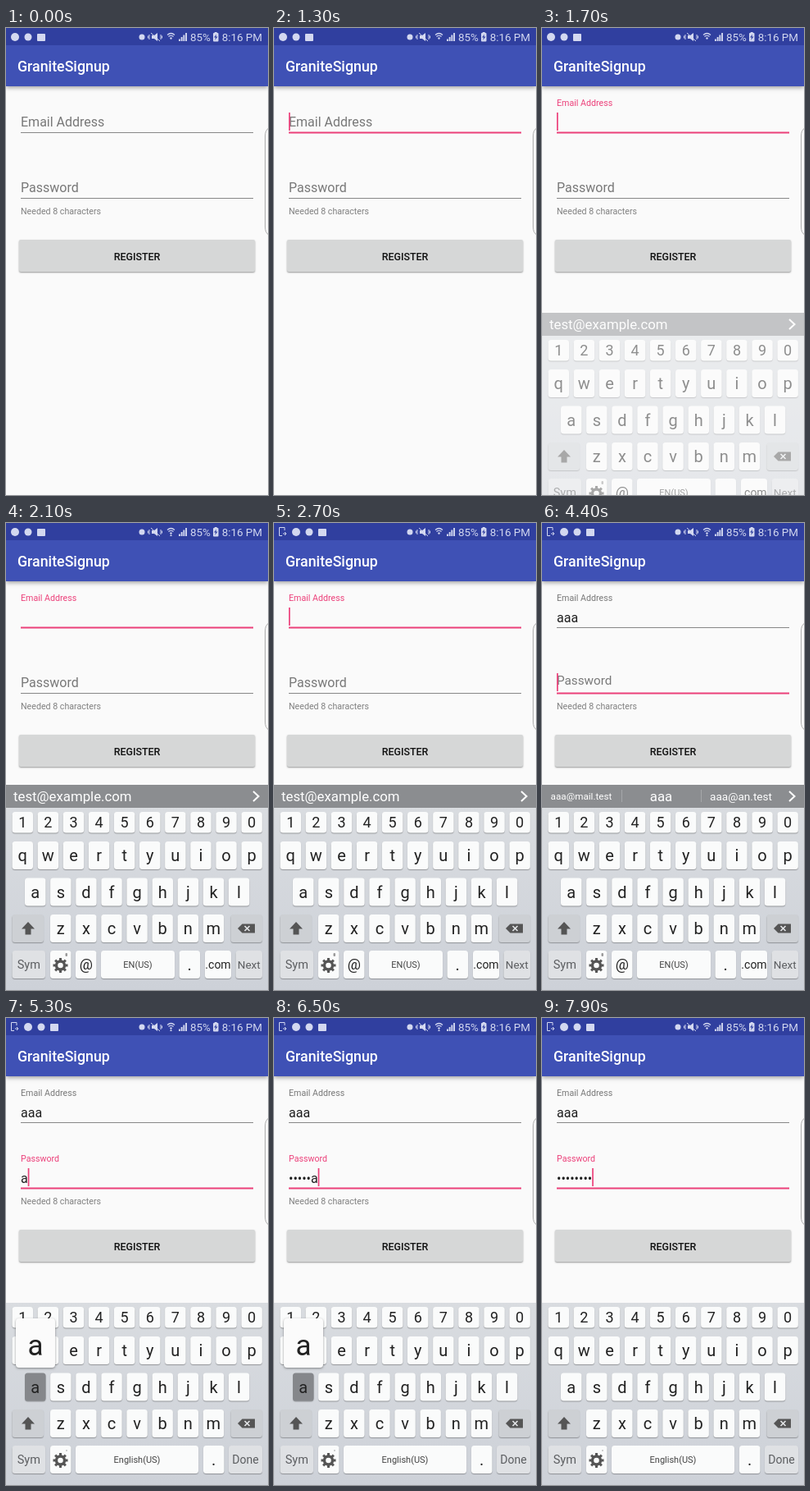
An HTML page with a canvas for the animation above (8 s loop, 320x569 px).

```html
<!DOCTYPE html>
<html lang="en">
<head>
<meta charset="utf-8">
<title>Sign-up form</title>
<style>
  html, body { margin: 0; width: 100%; height: 100%; overflow: hidden; background: #fafafa; }
  canvas { display: block; width: 320px; height: 569px; }
</style>
</head>
<body>
<canvas id="stage"></canvas>
<script>
const canvas = document.getElementById('stage');
const ctx = canvas.getContext('2d');
const ratio = window.devicePixelRatio || 1;
canvas.width = 320 * ratio;
canvas.height = 569 * ratio;

const LOOP = 8000;
const PAPER = '#fafafa', PINK = '#ec407a', GREY = '#787878', ICON = '#d3d8f0';

// Timeline in milliseconds
const FOCUS_EMAIL = 1300, FOCUS_PASSWORD = 4355;
const KEYBOARD_IN = 1500, KEYBOARD_READY = 2000, KEYBOARD_SWAP = 4550;
const NOTICE = 2150, SUGGESTIONS = 3690, MASK_LAST = 7850;
const emailPresses = [2850, 3130, 3400];
const passwordPresses = Array.from({ length: 8 }, (_, i) => 5180 + 262 * i);
const presses = [...emailPresses, ...passwordPresses];
const blinkResets = [FOCUS_EMAIL, FOCUS_PASSWORD, ...presses, 7190, MASK_LAST];
const HOLD = 130, LINGER = 50;

const clamp = v => Math.max(0, Math.min(1, v));
const ease = v => { const p = clamp(v); return p * p * (3 - 2 * p); };
const mix = (a, b, p) => a + (b - a) * p;
const countBefore = (times, t) => times.filter(time => time <= t).length;

function text(str, x, y, size, color, align = 'left', weight = 400) {
  ctx.font = `${weight} ${size}px Roboto, sans-serif`;
  ctx.textAlign = align;
  ctx.fillStyle = color;
  ctx.fillText(str, x, y);
  return ctx.measureText(str).width;
}

function rect(x, y, w, h, color) {
  ctx.fillStyle = color;
  ctx.fillRect(x, y, w, h);
}

function box(x, y, w, h, r, color) {
  ctx.beginPath();
  ctx.roundRect(x, y, w, h, r);
  ctx.fillStyle = color;
  ctx.fill();
}

function disc(x, y, r, color) {
  ctx.beginPath();
  ctx.arc(x, y, r, 0, 7);
  ctx.fillStyle = color;
  ctx.fill();
}

function stroke(path, color, width = 1) {
  ctx.strokeStyle = color;
  ctx.lineWidth = width;
  ctx.stroke(new Path2D(path));
}

function fill(path, color) {
  ctx.fillStyle = color;
  ctx.fill(new Path2D(path));
}

function shadowed(blur, dy, alpha, draw) {
  ctx.save();
  ctx.shadowColor = `rgba(0,0,0,${alpha})`;
  ctx.shadowBlur = blur * ratio;
  ctx.shadowOffsetY = dy * ratio;
  draw();
  ctx.restore();
}

function statusBar(t) {
  rect(0, 0, 320, 21, '#303f9f');
  let x = 11;
  if (t >= NOTICE) {
    stroke('M13 9V5.5H6.5V15.5H10M11 13H15M13 11L15 13L13 15', ICON);
    x = 27;
  }
  disc(x, 11, 5, ICON);
  disc(x + 16, 11, 4.5, ICON);
  box(x + 27, 7, 10, 9, 1, ICON);

  disc(166, 11, 3.5, ICON);
  fill('M178 9h3l4-3v10l-4-3h-3z', ICON);
  stroke('M177 6L188 16M175 8v6M189 8v6M173.500 9.500v3M190.500 9.500v3', ICON);
  stroke('M197 8.500Q201.500 4.500 206 8.500M198.500 10.500Q201.500 8 204.500 10.500', ICON, 1.2);
  disc(201.5, 12.5, 1.2, ICON);
  if (t > 2000 && t % 400 < 250) fill('M200 16l1.500-2 1.500 2z', ICON);
  for (let i = 0; i < 4; i++) rect(211 + i * 2.7, 13.5 - i * 2.5, 1.9, 2.5 + i * 2.5, ICON);
  text('85%', 225, 16, 13.4, ICON);
  box(253, 6, 6.5, 10.5, 1, ICON);
  rect(254.7, 5, 3, 1, ICON);
  fill('M257 7.500l-3 4h2l-.8 3.500 3.200-4.500h-2z', '#303f9f');
  text('8:16 PM', 313, 16, 13.4, ICON, 'right');
}

function field(y, label, value, focused, lifted, cursorOn) {
  const color = focused && lifted > 0.3 ? PINK : GREY;
  text(label, 18, mix(y - 7, y - 32, lifted), mix(16, 10.67, lifted), color);
  if (focused) rect(18, y - 0.5, 284, 2, PINK);
  else rect(18, y, 284, 1, '#878787');
  const width = value ? text(value, 18, y - 6.5, 16, '#1f1f1f') : 0;
  if (focused && cursorOn) rect(18 + width, y - 24, 1.7, 22, PINK);
}

function form(t) {
  rect(0, 0, 320, 569, PAPER);
  shadowed(5, 2, 0.35, () => rect(0, 21, 320, 50, '#3f51b5'));
  statusBar(t);
  text('GraniteSignup', 14, 53, 17.8, '#fff', 'left', 500);

  const lastReset = Math.max(...blinkResets.filter(time => time <= t), 0);
  const cursorOn = (t - lastReset) % 1000 < 500;
  const onPassword = t >= FOCUS_PASSWORD;
  const typed = countBefore(passwordPresses, t);
  const secret = !typed ? '' : t >= MASK_LAST ? '•'.repeat(typed) : '•'.repeat(typed - 1) + 'a';

  field(127, 'Email Address', 'a'.repeat(countBefore(emailPresses, t)),
    t >= FOCUS_EMAIL && !onPassword, ease((t - FOCUS_EMAIL) / 200), cursorOn);
  field(207, 'Password', secret, onPassword, ease((t - FOCUS_PASSWORD) / 200), cursorOn);
  if (typed < 8) text('Needed 8 characters', 18, 227, 10.67, '#808080');

  shadowed(2, 1, 0.4, () => box(16, 258, 288, 39, 2, '#d6d7d7'));
  text('REGISTER', 160, 282.5, 12.44, '#111', 'center', 500);
  stroke('M321 122Q316.500 124 316.500 132V242Q316.500 250 321 252', '#aaa');
}

function key(x, y, w, h, label, size = 20, tone = '#fafbfb', color = '#222') {
  shadowed(1, 1, 0.3, () => box(x, y, w, h, 3.5, tone));
  if (label) text(label, x + w / 2, y + h / 2 + size * 0.35, size, color, 'center');
}

function keyRow(chars, x, y, h, size, pressed) {
  [...chars].forEach((char, i) =>
    key(x + i * 31.1, y, 25.5, h, char, size, char === 'a' && pressed ? '#85878b' : undefined));
}

function suggestionBar(t) {
  rect(0, 319, 320, 28, '#8b8d90');
  const typed = countBefore(emailPresses, t);
  if (!typed) {
    text('test@example.com', 9, 339, 16.8, '#fff');
  } else {
    text('a'.repeat(typed), 145.5, 339, 16.8, '#fff', 'center');
    rect(97, 325, 1, 15, '#a5a7a9');
    rect(194, 325, 1, 15, '#a5a7a9');
    if (t >= SUGGESTIONS) {
      text('aaa@mail.test', 48, 337, 11.7, '#fff', 'center');
      text('aaa@an.test', 243, 338, 13.6, '#fff', 'center');
    }
  }
  stroke('M302 327L308.500 333L302 339', '#fff', 2);
}

function gear(x, y) {
  ctx.beginPath();
  ctx.arc(x, y, 5, 0, 7);
  ctx.strokeStyle = '#555';
  ctx.lineWidth = 3.4;
  ctx.stroke();
  for (let i = 0; i < 8; i++) {
    ctx.save();
    ctx.translate(x, y);
    ctx.rotate(i * Math.PI / 4);
    rect(-1.5, -9, 3, 4, '#555');
    ctx.restore();
  }
}

function keyboard(t) {
  const soft = '#dfe1e4', dim = '#5c5e61';
  const passwordMode = t >= KEYBOARD_SWAP;
  const gap = t - Math.max(...presses.filter(time => time <= t), -LOOP);
  const pressed = gap < HOLD;

  const back = ctx.createLinearGradient(0, 347, 0, 569);
  back.addColorStop(0, '#d9dce0');
  back.addColorStop(1, '#cdd1d8');
  rect(0, 347, 320, 222, back);
  if (!passwordMode) suggestionBar(t);

  keyRow('1234567890', 7.5, 352, 25.5, 18);
  keyRow('qwertyuiop', 7.5, 388, 34, 20);
  keyRow('asdfghjkl', 23, 432.5, 34, 20, pressed);
  keyRow('zxcvbnm', 54, 477, 34, 20);
  key(7.5, 477, 38.5, 34, '', 0, '#cdd0d4');
  fill('M27 486l8 8.500h-4.500v7h-7v-7H19z', '#555');
  key(274.5, 477, 38.5, 34, '', 0, '#cdd0d4');
  fill('M283 494l5.500-5.500H304v11H288.500z', '#555');
  stroke('M291.500 491l6 6M297.500 491l-6 6', '#e4e6e8', 1.6);

  key(7.5, 521, 40.500, 34, 'Sym', 14.5, soft, dim);
  key(54, 521, 25.5, 34, '', 0);
  gear(66.5, 539);
  if (passwordMode) {
    disc(74, 527, 0.8, '#999');
    key(85, 521, 150, 34, 'English(US)', 11, undefined, '#444');
    key(241, 521, 25.5, 34, '.');
    key(272, 521, 41, 34, 'Done', 14, soft, dim);
  } else {
    box(72.5, 524, 2.5, 4, 1, '#999');
    key(85, 521, 25.5, 34, '@', 18);
    key(116, 521, 90, 34, 'EN(US)', 11, undefined, '#444');
    key(211.5, 521, 25.5, 34, '.');
    key(243, 521, 32, 34, '.com', 14);
    key(280.5, 521, 32.5, 34, 'Next', 13.5, soft, dim);
  }

  if (gap < HOLD + LINGER) {
    shadowed(3, 1, 0.4, () => box(12, 366, 48, 60, 4, '#fbfbfb'));
    text('a', 36, 411, 35, '#222', 'center');
  }
}

function draw(t) {
  ctx.setTransform(ratio, 0, 0, ratio, 0, 0);
  form(t);
  if (t < KEYBOARD_IN) return;
  const shown = clamp((t - KEYBOARD_IN) / (KEYBOARD_READY - KEYBOARD_IN) + 0.1);
  ctx.translate(0, Math.round(62 * (1 - shown) * 0.9));
  keyboard(t);
  // The plain page behind the keys shows through while they fade in.
  ctx.globalAlpha = 1 - shown;
  rect(0, 319, 320, 250, PAPER);
  ctx.globalAlpha = 1;
}

function tick() {
  draw(performance.now() % LOOP);
  requestAnimationFrame(tick);
}
tick();
</script>
</body>
</html>
```
